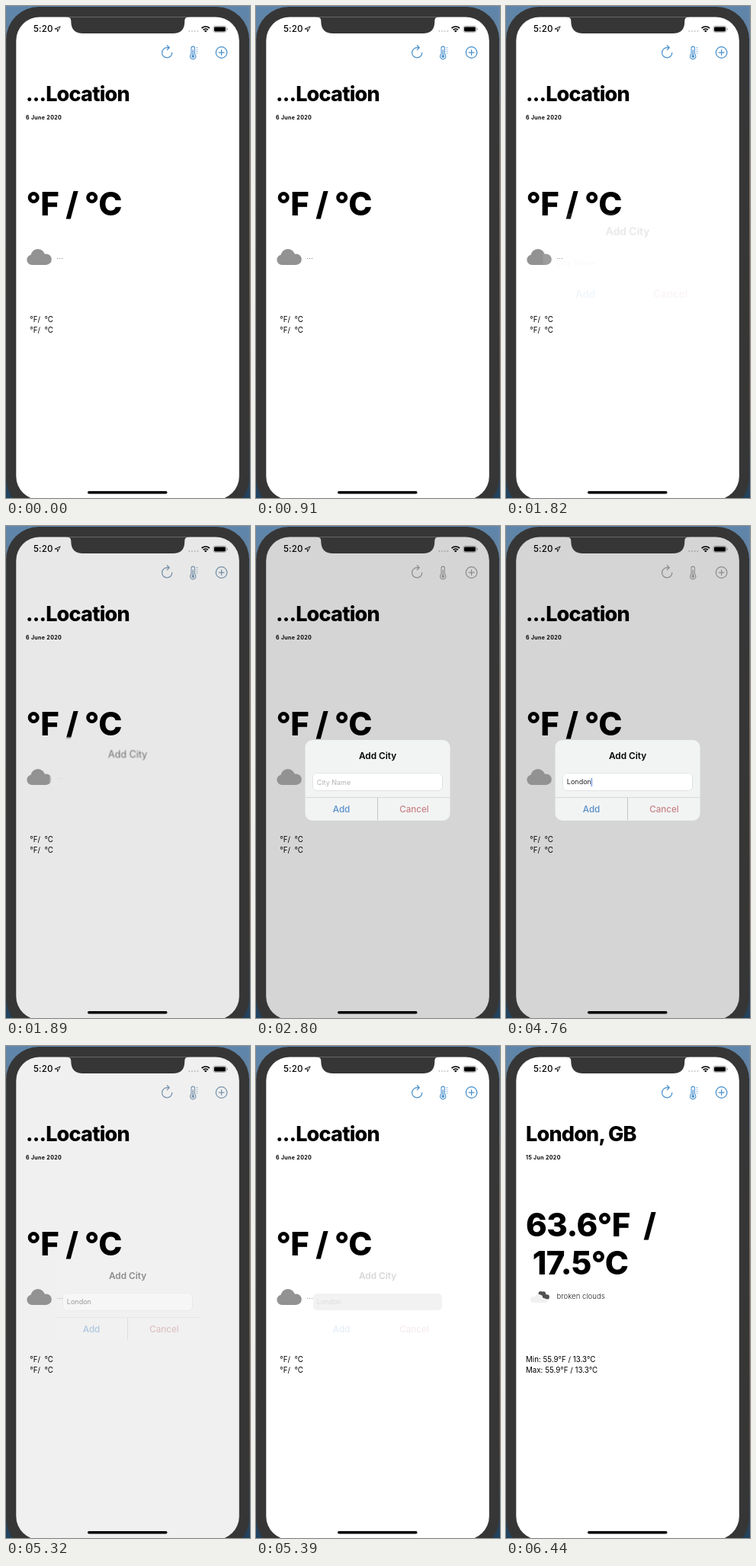
An HTML page that plays this animation: 320 by 646 pixels, repeating every 6510 ms.

```html
<!DOCTYPE html>
<html lang="en">
<head>
<meta charset="utf-8">
<title>Weather app</title>
<style>
  html, body { margin: 0; width: 100%; height: 100%; overflow: hidden; background: #4b6d8e; }
  svg { display: block; width: 100%; height: 100%; }
  text { font-family: Inter, Roboto, sans-serif; }

  .anim, .typed tspan { animation: 6.51s step-end infinite; }

  .city { font-size: 27px; font-weight: 800; letter-spacing: -.8px; }
  .date { font-size: 7px; font-weight: 700; letter-spacing: .36px; }
  .temp { font-size: 42px; font-weight: 800; letter-spacing: -.5px; }
  .sky { font-size: 9.6px; font-weight: 300; fill: #222; }
  .range { font-size: 9.75px; }

  /* dialog */
  .shade { opacity: 0; animation-name: shade; }
  .tools { color: #4a90cc; animation-name: tools; }
  .ticks { animation-name: ticks; }
  .dialog { opacity: 0; transform-origin: 159.5px 334px; animation-name: dialog; }
  .panel { fill: #f2f4f4; animation-name: panel; }
  .title { font-size: 11.8px; font-weight: 600; text-anchor: middle; animation-name: title; }
  .parts { animation-name: parts; }
  .lines { animation-name: lines; }
  .field { fill: #fff; animation-name: field; }
  .btn { font-size: 11.6px; font-weight: 500; text-anchor: middle; }
  .hint { font-size: 9px; fill: #b4b4b4; animation-name: hint; }

  /* typing */
  .typed { font-size: 9px; fill: #222; }
  .typed tspan { fill-opacity: 0; }
  .typed tspan:nth-child(1) { animation-name: key1; }
  .typed tspan:nth-child(2) { animation-name: key2; }
  .typed tspan:nth-child(3) { animation-name: key3; }
  .typed tspan:nth-child(4) { animation-name: key4; }
  .typed tspan:nth-child(5) { animation-name: key5; }
  .typed tspan:nth-child(6) { animation-name: key6; }
  .caret { opacity: 0; animation-name: caret; }

  /* loaded weather */
  .before { animation-name: before; }
  .after { opacity: 0; animation-name: after; }
  .cloud { animation-name: cloud; }
  .broken { opacity: 0; animation-name: broken; }

  @keyframes shade {
    0% { opacity: 0 } 29.03% { opacity: .09 } 30.1% { opacity: .14 } 31.18% { opacity: .165 }
    80.64% { opacity: .12 } 81.72% { opacity: .06 } 82.79%, 100% { opacity: 0 }
  }
  @keyframes tools {
    0% { color: #4a90cc } 29.03% { color: #7f9db8 } 30.1% { color: #a8a8a8 }
    81.72% { color: #7f9db8 } 82.79%, 100% { color: #4a90cc }
  }
  @keyframes ticks { 0% { opacity: .6 } 30.1% { opacity: 0 } 81.72%, 100% { opacity: .6 } }
  @keyframes dialog {
    0% { opacity: 0; transform: scale(1.2) }
    27.95% { opacity: .1; transform: scale(1.17) }
    29.03% { opacity: .8; transform: scale(1.07) }
    30.1% { opacity: .95; transform: scale(1.02) }
    31.18% { opacity: 1; transform: scale(1) }
    80.64% { opacity: .75; transform: scale(1) }
    81.72% { opacity: .42; transform: scale(1) }
    82.79% { opacity: .16; transform: scale(1) }
    83.87% { opacity: .05; transform: scale(1) }
    84.94%, 100% { opacity: 0; transform: scale(1) }
  }
  @keyframes panel { 0% { fill: #fff } 29.03% { fill: #e8e8e8 } 30.1% { fill: #f2f4f4 } 82.79%, 100% { fill: #fff } }
  @keyframes title {
    0% { opacity: 1; font-weight: 600 } 29.03% { opacity: .65; font-weight: 400 }
    30.1%, 100% { opacity: 1; font-weight: 600 }
  }
  @keyframes parts { 0% { opacity: 1 } 29.03% { opacity: 0 } 30.1%, 100% { opacity: 1 } }
  @keyframes lines { 0% { opacity: 0 } 30.1% { opacity: 1 } 82.79%, 100% { opacity: 0 } }
  @keyframes field { 0% { fill: #fff } 82.79%, 100% { fill: #aeaeae } }
  @keyframes hint { 0% { opacity: 1 } 53.76%, 100% { opacity: 0 } }
  @keyframes key1 { 0% { fill-opacity: 0 } 53.76%, 100% { fill-opacity: 1 } }
  @keyframes key2 { 0% { fill-opacity: 0 } 59.13%, 100% { fill-opacity: 1 } }
  @keyframes key3 { 0% { fill-opacity: 0 } 62.36%, 100% { fill-opacity: 1 } }
  @keyframes key4 { 0% { fill-opacity: 0 } 65.59%, 100% { fill-opacity: 1 } }
  @keyframes key5 { 0% { fill-opacity: 0 } 69.89%, 100% { fill-opacity: 1 } }
  @keyframes key6 { 0% { fill-opacity: 0 } 72.04%, 100% { fill-opacity: 1 } }
  @keyframes caret {
    0% { opacity: 0; transform: translateX(0) }
    53.76% { opacity: 1; transform: translateX(5.4px) }
    59.13% { opacity: 1; transform: translateX(10.8px) }
    62.36% { opacity: 1; transform: translateX(16.1px) }
    65.59% { opacity: 1; transform: translateX(21.5px) }
    69.89% { opacity: 1; transform: translateX(27px) }
    72.04% { opacity: 1; transform: translateX(32.2px) }
    80.64%, 100% { opacity: 0; transform: translateX(32.2px) }
  }
  @keyframes before { 0% { opacity: 1 } 88.17%, 100% { opacity: 0 } }
  @keyframes after { 0% { opacity: 0 } 88.17%, 100% { opacity: 1 } }
  @keyframes cloud { 0% { opacity: 1 } 93.54%, 100% { opacity: 0 } }
  @keyframes broken { 0% { opacity: 0 } 93.54%, 100% { opacity: 1 } }
</style>
</head>
<body>
<svg viewBox="0 0 320 646" preserveAspectRatio="none">
  <defs>
    <linearGradient id="wall" x1="0" y1="0" x2="0" y2="1">
      <stop offset="0" stop-color="#5f86ab"/>
      <stop offset=".3" stop-color="#66727d"/>
      <stop offset=".6" stop-color="#4f5a62"/>
      <stop offset="1" stop-color="#21425f"/>
    </linearGradient>
    <linearGradient id="edge" x1="0" y1="0" x2="0" y2="1">
      <stop offset="0" stop-color="#6288ae"/>
      <stop offset=".35" stop-color="#857462"/>
      <stop offset=".8" stop-color="#5d4c3d"/>
      <stop offset="1" stop-color="#21425f"/>
    </linearGradient>
    <clipPath id="screen"><rect x="13.3" y="14.4" width="292.5" height="634" rx="31"/></clipPath>
  </defs>

  <rect width="320" height="646" fill="url(#wall)"/>
  <rect x="317" width="3" height="646" fill="url(#edge)"/>
  <rect x=".2" y="1" width="318.8" height="662" rx="43" fill="#363636"/>

  <g clip-path="url(#screen)">
    <rect x="13" y="14" width="294" height="636" fill="#fff"/>

    <g class="anim before">
      <text class="city" x="26" y="125.3">...Location</text>
      <text class="date" x="26" y="148.8">6 June 2020</text>
      <text class="temp" x="26.5" y="275.3">°F / °C</text>
      <text class="sky" x="66.5" y="331.5">...</text>
      <text class="range" x="31.2" y="414.5">°F/&#160;&#160;°C</text>
      <text class="range" x="31.2" y="428.5">°F/&#160;&#160;°C</text>
    </g>
    <g class="anim after">
      <text class="city" x="26" y="125.3">London, GB</text>
      <text class="date" x="26" y="148.8">15 Jun 2020</text>
      <text class="temp" x="26" y="250">63.6°F&#160;&#160;/</text>
      <text class="temp" x="26" y="300">&#160;17.5°C</text>
      <text class="sky" x="66.5" y="331.5">broken clouds</text>
      <text class="range" x="26" y="414.5">Min: 55.9°F / 13.3°C</text>
      <text class="range" x="26" y="428.5">Max: 55.9°F / 13.3°C</text>
    </g>

    <g class="anim broken">
      <g fill="#505050">
        <circle cx="45.5" cy="324.9" r="2.9"/>
        <circle cx="49.3" cy="325" r="2.7"/>
        <circle cx="50.3" cy="328.2" r="3"/>
        <circle cx="53.7" cy="329.4" r="3.2"/>
      </g>
      <g fill="#f1f1f1">
        <circle cx="36" cy="333" r="4"/>
        <circle cx="43" cy="331.3" r="5.4"/>
        <circle cx="51.5" cy="334.4" r="2.6"/>
        <rect x="36" y="332" width="15.5" height="5"/>
      </g>
    </g>

    <!-- toolbar -->
    <g class="anim tools" fill="none" stroke="currentColor" stroke-width="1.25" stroke-linecap="round" stroke-linejoin="round">
      <path d="M217.8 61.3A6.6 6.6 0 1 1 211.2 54.7H213.6M211.3 51.8L214.2 54.7L211.3 57.6"/>
      <path d="M243 63.2V55.3A2.2 2.2 0 0 1 247.4 55.3V63.2A3.7 3.7 0 1 1 243 63.2Z" stroke-width="1.1"/>
      <path d="M245.2 58V65" stroke-width="1.3"/>
      <circle cx="245.2" cy="66.1" r="1.9" fill="currentColor" stroke="none"/>
      <path class="anim ticks" d="M249.6 54.5H251.4M249.6 57H251.4M249.6 59.5H251.4M249.6 62H251.4" stroke-width=".9"/>
      <circle cx="282.6" cy="61" r="7.3"/>
      <path d="M279.2 61H286M282.6 57.6V64.4"/>
    </g>

    <!-- status bar -->
    <text x="36" y="34.4" font-size="11.6" font-weight="500" letter-spacing=".1">5:20</text>
    <path d="M71.2 26.8L64 30.2H67.6V33.8Z" fill="none" stroke="#222" stroke-linejoin="round"/>
    <g fill="#c8c8c8">
      <circle cx="240.3" cy="33" r="1"/>
      <circle cx="244" cy="33" r="1"/>
      <circle cx="247.7" cy="33" r="1"/>
      <circle cx="251.4" cy="33" r="1"/>
    </g>
    <g fill="none" stroke="#000" stroke-width="1.7">
      <path d="M256.6 29.2A7.3 7.3 0 0 1 267 29.2"/>
      <path d="M258.7 31.4A4.4 4.4 0 0 1 264.9 31.4"/>
    </g>
    <path d="M261.8 34.6L260 32.7A2.6 2.6 0 0 1 263.6 32.7Z"/>
    <rect x="272" y="26.4" width="16.8" height="8" rx="2.3" fill="none" stroke="#999" stroke-width=".8"/>
    <rect x="273" y="27.4" width="14.8" height="6" rx="1.3"/>
    <path d="M290 29.1V31.7" stroke="#999" stroke-width="1.1"/>

    <rect x="107" y="636.9" width="104.5" height="3.5" rx="1.75"/>
    <rect class="anim shade" x="13" y="14" width="294" height="636"/>

    <g class="anim cloud" fill="#929292">
      <circle cx="34.1" cy="333.3" r="6.7"/>
      <circle cx="41.8" cy="328.4" r="9.3"/>
      <circle cx="52.5" cy="332.7" r="7.3"/>
      <rect x="34.1" y="330" width="18.4" height="10"/>
    </g>

    <!-- notch -->
    <path d="M79 13V14.4C83.5 14.4 85.3 16 85.3 20C85.3 30.5 90.5 36 101 36H219C229.5 36 234.3 30.5 234.3 20C234.3 16 236 14.4 240.5 14.4V13Z" fill="#363636"/>
  </g>

  <g class="anim dialog">
    <rect class="anim panel" x="64.5" y="281" width="190" height="105.7" rx="9.5"/>
    <text class="anim title" x="159.5" y="305.8">Add City</text>
    <g class="anim parts">
      <g class="anim lines" fill="none">
        <path d="M64.5 356.5H254.5" stroke="#d6d9d9"/>
        <path d="M159.5 356.5V386.5" stroke="#c4c7c7"/>
        <rect x="74.8" y="324.9" width="169.6" height="22.4" rx="5.2" stroke="#dcdede"/>
      </g>
      <rect class="anim field" x="75" y="325" width="169" height="22" rx="5"/>
      <text class="anim hint" x="79.8" y="339.8">City Name</text>
      <text class="typed" x="79.8" y="339.2"><tspan>L</tspan><tspan>o</tspan><tspan>n</tspan><tspan>d</tspan><tspan>o</tspan><tspan>n</tspan></text>
      <rect class="anim caret" x="79.6" y="330.8" width="1.1" height="11.3" fill="#4478d8"/>
      <text class="btn" x="112" y="376.2" fill="#5a8fc8">Add</text>
      <text class="btn" x="207.4" y="376.2" fill="#c98286">Cancel</text>
    </g>
  </g>
</svg>
</body>
</html>
```
